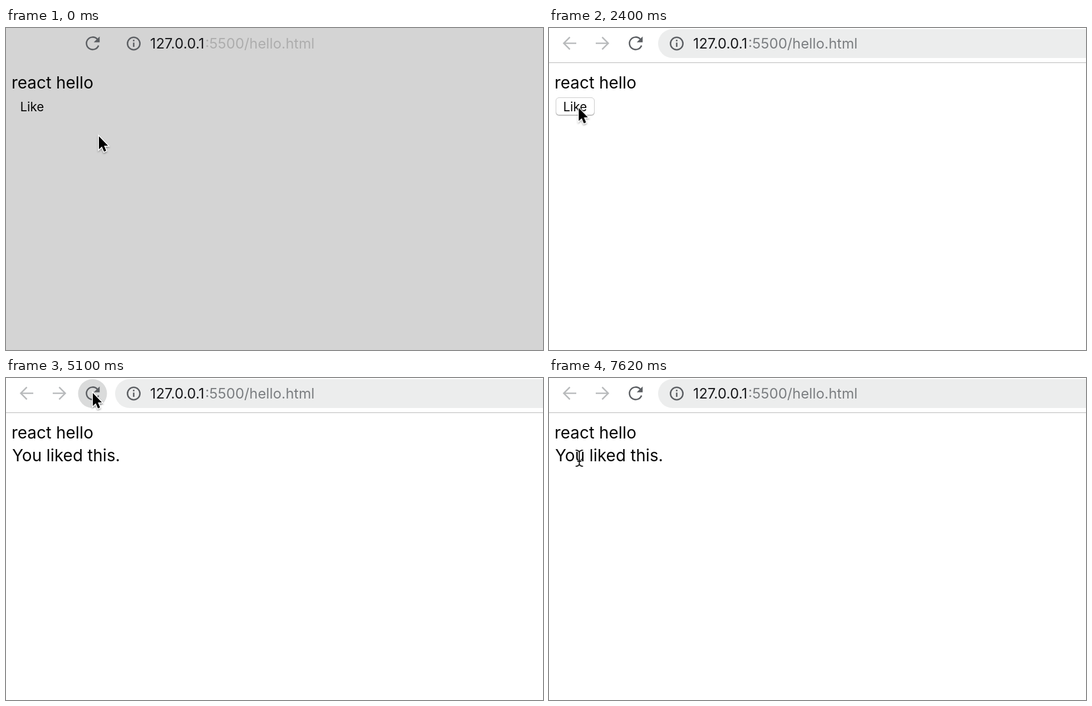
Animation, 965 px wide and 580 px high, one loop 7680 ms. Source, as an HTML page:

```html
<!DOCTYPE html>
<html lang="en">
<head>
<meta charset="utf-8">
<title>react hello</title>
<style>
  html, body { margin: 0; width: 100%; height: 100%; overflow: hidden; background: #d4d4d4; }
  svg { display: block; width: 965px; height: 580px; }
  text { font-family: Inter, "Open Sans", sans-serif; fill: #050505; }
  .body { font-size: 29.7px; }
  .label { font-size: 22.3px; }
  .url { font-size: 25.6px; }
  .host { fill: #18191c; }
  .icon { fill: none; stroke: #5c5f63; stroke-width: 2.6; }
  .nav { fill: none; stroke: #b8babc; stroke-width: 2.6; }

  /* Hard switches share one 7680 ms clock */
  .lit, .path, .like, .liked, .arrow, .beam { animation: 7680ms step-end infinite; }
  .lit { animation-name: lit; }
  .path { animation-name: path; }
  .like { animation-name: like; }
  .liked { animation-name: liked; }
  .arrow { animation-name: arrow; }
  .beam { animation-name: beam; }
  .hover { animation: hover 7680ms linear infinite; }
  .cursor { animation: move 7680ms ease-in-out infinite; }

  @keyframes lit { 0% { opacity: 0 } 14.0625%, 100% { opacity: 1 } }
  @keyframes path { 0% { fill: #adadad } 14.0625%, 100% { fill: #7b7e81 } }
  @keyframes like { 0%, 71.875% { opacity: 1 } 35.9375%, 95.3125%, 100% { opacity: 0 } }
  @keyframes liked { 0%, 71.875% { opacity: 0 } 35.9375%, 95.3125%, 100% { opacity: 1 } }
  @keyframes arrow {
    0%, 54.6875%, 74.21875% { opacity: 1 }
    35.9375%, 71.875%, 95.3125%, 100% { opacity: 0 }
  }
  @keyframes beam {
    0%, 54.6875%, 74.21875% { opacity: 0 }
    35.9375%, 71.875%, 95.3125%, 100% { opacity: 1 }
  }
  @keyframes hover {
    0%, 60.9375%, 70.3125%, 100% { opacity: 0 }
    62.5%, 68.75% { opacity: 1 }
  }
  @keyframes move {
    0%, 1.5625% { transform: translate(166px, 193px) }
    11.71875%, 23.4375% { transform: translate(57px, 144px) }
    31.25%, 47.65625% { transform: translate(52.5px, 142px) }
    60.9375%, 67.1875% { transform: translate(155px, 25px) }
    78.125% { transform: translate(57px, 146px) }
    85.9375%, 92.1875% { transform: translate(53px, 141px) }
    97.65625%, 100% { transform: translate(54.5px, 144px) }
  }
</style>
</head>
<body>
<svg viewBox="0 0 965 580">
  <defs>
    <filter id="shadow" x="-50%" y="-30%" width="200%" height="180%">
      <feDropShadow dx="0" dy="2" stdDeviation="1.5" flood-opacity=".35"/>
    </filter>
  </defs>

  <!-- Browser bar -->
  <g class="lit">
    <rect width="965" height="580" fill="#fff"/>
    <path d="M0 62.5H965" stroke="#b5b5b5"/>
    <rect x="196" y="2" width="820" height="52" rx="26" fill="#eceded"/>
    <path class="nav" d="M49 27.5H26.5M37.5 16.5L26.5 27.5L37.5 38.5"/>
    <path class="nav" d="M84 27.5H106.5M95.5 16.5L106.5 27.5L95.5 38.5"/>
  </g>
  <circle class="hover" cx="155.5" cy="28" r="26" fill="#dadbdb"/>
  <path class="icon" d="M164 20A11.2 11.2 0 1 0 166.3 31.5"/>
  <path d="M168.3 15.2V25.8H157.7Z" fill="#5c5f63"/>
  <circle class="icon" cx="229.5" cy="28" r="11.2"/>
  <path class="icon" d="M229.5 26.3V34M229.5 21.2V23.9"/>
  <text class="url host" x="259" y="37">127.0.0.1</text>
  <text class="url path" x="358" y="37">:5500/hello.html</text>

  <!-- Page -->
  <text class="body" x="10" y="109">react hello</text>
  <g class="like">
    <g class="lit">
      <rect x="12" y="126.5" width="70" height="31.5" rx="6" fill="#b4b4b4"/>
      <rect x="12.5" y="125.5" width="69" height="31" rx="5.5" fill="#fff" stroke="#c9c9c9"/>
    </g>
    <text class="label" x="25.5" y="150">Like</text>
  </g>
  <text class="body liked" x="11" y="150">You liked this.</text>

  <!-- Pointer -->
  <g class="cursor">
    <path class="arrow" filter="url(#shadow)" paint-order="stroke" stroke="#fff" stroke-width="3"
          d="M1 2V25.5L6.3 20.5L10.2 29.7L14 28L10.2 19H17.3Z"/>
    <g class="beam" fill="none">
      <g stroke="#fff" stroke-opacity=".75" stroke-width="4">
        <path id="ibeam" d="M-6.5 -14Q-1 -14 0 -10Q1 -14 6.5 -14M0 -10V11M-6.5 15Q-1 15 0 11Q1 15 6.5 15M-3.5 6H3.5"/>
      </g>
      <use href="#ibeam" stroke="#111" stroke-width="2"/>
    </g>
  </g>
</svg>
</body>
</html>
```
